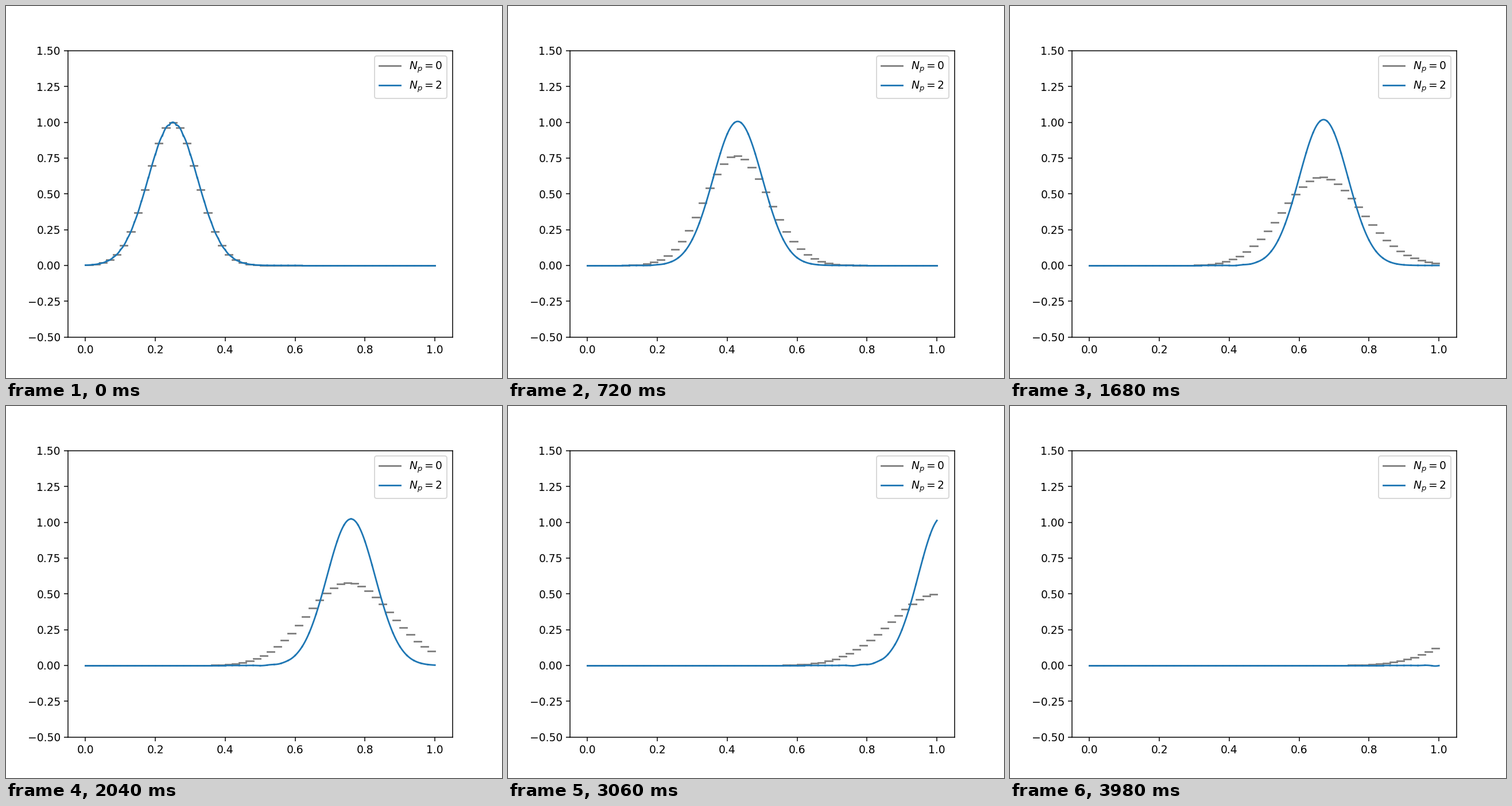
A matplotlib script for the animation above (4 s loop, 864x648 px).

```python
import numpy as np
import matplotlib.pyplot as plt
from matplotlib.animation import FuncAnimation

# Discontinuous Galerkin advection of a Gaussian pulse, forward Euler in time
CELLS = 50
FRAMES = 200
STEPS = 10                      # Euler steps per frame
DT = 0.0005
DX = 1 / CELLS
CENTERS = (np.arange(CELLS) + 0.5) * DX


def pulse_coeffs(order):
    """Pulse and its derivatives at the cell centers, in local units."""
    d = CENTERS - 0.25
    f = np.exp(-100 * d**2)
    terms = [f, -200 * d * f, ((200 * d)**2 - 200) * f]
    return np.array([t * (DX / 2)**k for k, t in enumerate(terms[:order + 1])])


def operators(order):
    """Update matrices for the own cell and for its upwind neighbour."""
    k = np.arange(order + 1)
    total = k[:, None] + k[None, :]
    mass = np.where(total % 2 == 0, 2 / (total + 1), 0.0)
    stiff = np.where(total % 2 == 1, 2 * k[:, None] / np.maximum(total, 1), 0.0)
    right, left = np.ones(order + 1), (-1.0)**k
    scale = 2 * DT / DX * np.linalg.inv(mass)
    own = scale @ (stiff - np.outer(right, right))
    upwind = scale @ np.outer(left, right)
    return own, upwind


def solve(order):
    own, upwind = operators(order)
    u = pulse_coeffs(order)
    history = [u]
    for _ in range(FRAMES - 1):
        for _ in range(STEPS):
            inflow = np.zeros_like(u)
            inflow[:, 1:] = u[:, :-1]
            u = u + own @ u + upwind @ inflow
        history.append(u)
    return history


class Curve:
    """One solution, drawn as a separate line in each cell."""

    def __init__(self, ax, order, points, color):
        xi = np.linspace(-1, 1, points)
        self.basis = xi[:, None]**np.arange(order + 1)
        self.history = solve(order)
        self.lines = []
        for i, c in enumerate(CENTERS):
            label = f"$N_p = {order}$" if i == 0 else None
            line, = ax.plot(c + xi * DX / 2, 0 * xi, color=color, label=label)
            self.lines.append(line)

    def show(self, frame):
        values = self.basis @ self.history[frame]
        for line, y in zip(self.lines, values.T):
            line.set_ydata(y)


fig, ax = plt.subplots(figsize=(6.4, 4.8), dpi=135)
curves = [Curve(ax, 0, 2, "tab:gray"), Curve(ax, 2, 10, "tab:blue")]
ax.set_xlim(-0.05, 1.05)
ax.set_ylim(-0.5, 1.5)
ax.legend(loc="upper right")


def draw(frame):
    for curve in curves:
        curve.show(frame)
    return [line for curve in curves for line in curve.lines]


anim = FuncAnimation(fig, draw, frames=FRAMES, interval=20, repeat=True)
plt.show()
```
